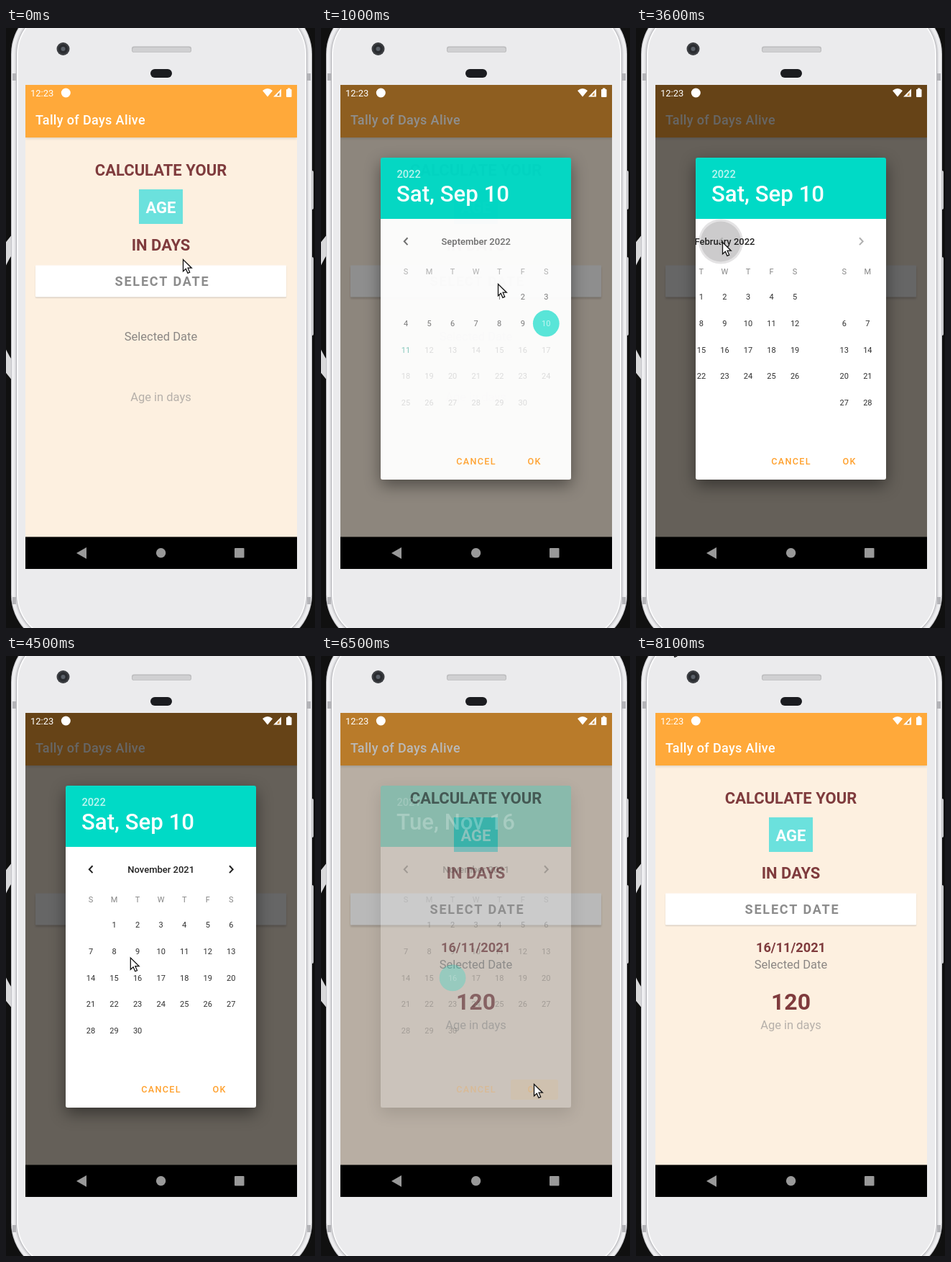
These frames come from a looping animation (430x833 px, 8.5 s). An HTML page with a canvas:

```html
<!DOCTYPE html>
<html lang="en">
<head>
<meta charset="utf-8">
<title>Age in days</title>
<style>
html, body { margin: 0; width: 100%; height: 100%; overflow: hidden; background: #101010; }
canvas { display: block; width: 430px; height: 833px; }
</style>
</head>
<body>
<canvas id="stage"></canvas>
<script>
const LOOP = 8500, STEP = 100;
const TEAL = '#00dac6', ORANGE = '#ffa93a', AMBER = '#ffa12e', WINE = '#7f3b3d';
const MONTHS = ['January', 'February', 'March', 'April', 'May', 'June', 'July',
  'August', 'September', 'October', 'November', 'December'];
const PAGE_WIDTH = 264;
const DIALOG = { x: 83, y: 180, w: 265, h: 447, header: 85 };

const CURSOR_START = [246, 321];
const CURSOR_MOVES = [
  { from: 0, until: 300, to: [246, 355] },
  { from: 1200, until: 1900, to: [120, 297], bend: [-100, -145] },
  { from: 4200, until: 4300, to: [172, 406] },
  { from: 4400, until: 4900, to: [174, 437] },
  { from: 5400, until: 6000, to: [296, 594] },
  { from: 6700, until: 7100, to: [189, 249] },
  { from: 7300, until: 8100, to: [47, -18] },
];

const canvas = document.getElementById('stage');
const ctx = canvas.getContext('2d');
const ratio = window.devicePixelRatio || 1;
canvas.width = 430 * ratio;
canvas.height = 833 * ratio;

const progress = (time, from, until) =>
  Math.min(1, Math.max(0, (time - from) / (until - from)));
const easeOut = (f, power) => 1 - (1 - f) ** power;
const smooth = f => f * f * (3 - 2 * f);

function rect(x, y, w, h, color, radius = 0) {
  ctx.fillStyle = color;
  ctx.beginPath();
  ctx.roundRect(x, y, w, h, radius);
  ctx.fill();
}

function disc(x, y, r, color) {
  ctx.fillStyle = color;
  ctx.beginPath();
  ctx.arc(x, y, r, 0, 2 * Math.PI);
  ctx.fill();
}

function shape(path, color, x = 0, y = 0, outline) {
  ctx.save();
  ctx.translate(x, y);
  const p = new Path2D(path);
  ctx.fillStyle = color;
  ctx.fill(p);
  if (outline) {
    ctx.strokeStyle = outline;
    ctx.lineWidth = 1.3;
    ctx.stroke(p);
  }
  ctx.restore();
}

function text(str, x, y, size, weight, color, align = 'center', spacing = 0) {
  ctx.font = `${weight} ${size}px Roboto, sans-serif`;
  ctx.letterSpacing = spacing + 'px';
  ctx.textAlign = align;
  ctx.fillStyle = color;
  ctx.fillText(str, x, y);
}

function withShadow(offset, blur, alpha, draw) {
  ctx.save();
  ctx.shadowColor = `rgba(0,0,0,${alpha})`;
  ctx.shadowOffsetY = offset * ratio;
  ctx.shadowBlur = blur * ratio;
  draw();
  ctx.restore();
}

function drawPhone() {
  rect(0, 0, 430, 833, '#101010');
  ctx.strokeStyle = '#d8d8da';
  ctx.lineWidth = 17;
  ctx.beginPath();
  ctx.arc(120, 388, 142, 0, 2 * Math.PI);
  ctx.stroke();

  rect(422, 198, 6, 54, '#c9c9cc', 2);
  rect(422, 318, 6, 109, '#c9c9cc', 2);

  // Rim: nested outlines, each [inset, colour]
  const rim = [[0, '#c4c4c8'], [1, '#eeeef0'], [5, '#dcdcdf'], [7, '#b6b6ba'],
    [8, '#fafafb'], [10, '#ebebed']];
  for (const [inset, color] of rim) {
    rect(7 + inset, inset - 34, 419 - 2 * inset, 891 - 2 * inset, color, 70 - inset);
  }
  for (const x of [9, 419]) {
    rect(x, 63, 5, 10, '#b4b4b8');
    rect(x, 790, 5, 10, '#b4b4b8');
  }

  disc(79.5, 29, 9, '#3c3e42');
  disc(79.5, 29, 6.5, '#2a2c30');
  disc(79.5, 29, 3, '#5a6068');
  rect(175, 25.5, 83, 8.5, '#bcbcbe', 3);
  rect(176, 27, 81, 6.5, '#d0d0d2', 3);
  rect(201, 57, 30, 12, '#1b1c20', 6);
}

function drawApp(time) {
  rect(27, 79, 378, 628, '#fdf0e0');
  ctx.save();
  ctx.beginPath();
  ctx.rect(27, 79, 378, 628);
  ctx.clip();
  withShadow(1, 4, .16, () => rect(27, 79, 378, 73, ORANGE));
  ctx.restore();
  text('Tally of Days Alive', 41, 133.5, 18, 500, '#fff', 'left', .35);

  text('CALCULATE YOUR', 215.5, 204.5, 22, 700, WINE);
  rect(185, 224, 61, 48, '#6be1dd');
  text('AGE', 215.5, 257, 22, 700, '#fff');
  text('IN DAYS', 215.5, 309, 22, 700, WINE);

  const lift = time >= 600 && time < 6600 ? 2 : 1;
  withShadow(1.2 * lift, 1.5 * lift, .16, () => rect(41, 329.5, 349, 44, '#fff', 1));
  text('SELECT DATE', 217.5, 358, 18, 700, '#8c8c8c', 'center', 1.8);

  if (time >= 6400) {
    text('16/11/2021', 215.5, 411, 18.2, 700, WINE);
    text('120', 215.5, 491, 32, 700, WINE);
  }
  text('Selected Date', 215.5, 433.5, 16.5, 400, '#8b8784');
  text('Age in days', 215.5, 517.5, 16.5, 400, '#b6b0aa');
}

function drawSystemBars() {
  text('12:23', 34, 94.7, 13, 400, '#fff', 'left');
  disc(83.3, 90, 6.5, '#fff');
  shape('M357 87q7-6 14 0l-7 8.5z M383 84.5v11h-11z', '#fff');
  rect(390, 85, 7.5, 11, '#fff', 1);
  rect(392, 83.5, 3.5, 2, '#fff');
  shape('M380.5 89v5h-3.5z', '#c58a3c');

  rect(27, 706.5, 378, 44.5, '#000');
  shape('M98 729l14-8v16z', '#999');
  disc(215.6, 728.8, 6.7, '#999');
  rect(318, 722, 13.5, 13.5, '#999', 1);
}

function drawPage(back, shift, selected) {
  const first = new Date(2022, 8 - back, 1);
  const year = first.getFullYear(), month = first.getMonth();
  const count = new Date(year, month + 1, 0).getDate();
  const column = i => 118 + 32.55 * i + shift;

  text(`${MONTHS[month]} ${year}`, 215.7 + shift, 300.8, 13, 500, '#212121');
  [...'SMTWTFS'].forEach((name, i) => text(name, column(i), 342.2, 11, 400, '#858585'));
  for (let day = 1; day <= count; day++) {
    const cell = first.getDay() + day - 1;
    const x = column(cell % 7), y = 373.3 + 36.7 * Math.floor(cell / 7);
    let color = '#303030';
    if (back === 0 && day > 10) color = day === 11 ? '#45ab99' : '#cacaca';
    if (back === selected.back && day === selected.day) {
      disc(x, y + .2, 18.4, TEAL);
      color = '#fff';
    }
    text(day, x, y + 4, 11, 400, color);
  }
}

function drawChevron(x, direction, color) {
  ctx.strokeStyle = color;
  ctx.lineWidth = 2;
  ctx.beginPath();
  ctx.moveTo(x - 2.5 * direction, 291.3);
  ctx.lineTo(x + 2.2 * direction, 296.2);
  ctx.lineTo(x - 2.5 * direction, 301.1);
  ctx.stroke();
}

function drawDialogShadow({ x, y, w, h }) {
  ctx.save();
  ctx.beginPath();
  ctx.rect(27, 79, 378, 627);
  ctx.rect(x, y, w, h);
  ctx.clip('evenodd');
  withShadow(8, 22, .45, () => rect(x, y, w, h, '#000', 3));
  ctx.restore();
}

function drawDialog(time, alpha, contentAlpha) {
  const { x, y, w, h, header } = DIALOG;
  const picked = time >= 5300;
  const selected = picked ? { back: 10, day: 16 } : { back: 0, day: 10 };

  ctx.save();
  ctx.globalAlpha = alpha;
  drawDialogShadow(DIALOG);
  rect(x, y + header, w, h - header, '#fff', [0, 0, 3, 3]);
  rect(x, y, w, header, TEAL, [3, 3, 0, 0]);
  text(picked ? 2021 : 2022, 105.5, 208.3, 14.6, 500, 'rgba(255,255,255,.75)', 'left');
  text(picked ? 'Tue, Nov 16' : 'Sat, Sep 10', 105, 241, 31.2, 500, '#fff', 'left');

  ctx.beginPath();
  ctx.rect(x, y + header, w, h - header);
  ctx.clip();
  ctx.globalAlpha = alpha * contentAlpha;

  const paging = time >= 3100 && time < 4300;
  if (paging) {
    disc(118, 296.5, 31, '#e4e3e4');
    disc(118, 296.5, 28, '#cccbcc');
  }
  if (time >= 5100 && !picked) disc(183.1, 447, 18.4, '#d2d2d2');

  const back = 10 * easeOut(progress(time, 3000, 4300), 1.767);
  const page = Math.floor(back), part = back - page;
  drawPage(page, part * PAGE_WIDTH, selected);
  if (part) drawPage(page + 1, (part - 1) * PAGE_WIDTH, selected);

  const chevronColor = paging ? '#b0b0b0' : '#222';
  drawChevron(118, -1, chevronColor);
  if (time >= 3100) drawChevron(313.5, 1, chevronColor);

  ctx.globalAlpha = alpha;
  if (time >= 6400) rect(264, 588, 66, 28, 'rgba(255,161,46,.3)', 3);
  text('CANCEL', 188.3, 606, 12.6, 500, AMBER, 'left', 1.3);
  text('OK', 287.5, 606, 12.6, 500, AMBER, 'left', 1.3);
  ctx.restore();
}

function cursorAt(time) {
  let point = CURSOR_START;
  for (const { from, until, to, bend = [0, 0] } of CURSOR_MOVES) {
    if (time < from) break;
    const f = easeOut(progress(time, from, until), 2.3);
    point = point.map((v, i) => v + (to[i] - v) * f + bend[i] * Math.sin(Math.PI * f));
  }
  return point;
}

function draw(now) {
  const time = Math.floor((now % LOOP) / STEP) * STEP;
  const opening = progress(time, 800, 1100), closing = progress(time, 6300, 6600);
  const dim = .6 * smooth(opening) * (1 - closing ** 1.5);
  const dialogAlpha = easeOut(opening, 3) * (1 - smooth(closing));

  ctx.setTransform(ratio, 0, 0, ratio, 0, 0);
  drawPhone();
  drawApp(time);
  rect(27, 79, 378, 628, `rgba(0,0,0,${dim})`);
  drawSystemBars();
  if (dialogAlpha > 0) drawDialog(time, dialogAlpha, opening);
  shape('M.5 .5v16.3l3.8-3.5 2.6 6 2.8-1.2-2.6-5.9h5.2z', '#fff', ...cursorAt(time), '#111');
}

const start = performance.now();
function tick() {
  draw(performance.now() - start);
  requestAnimationFrame(tick);
}
tick();
</script>
</body>
</html>
```
